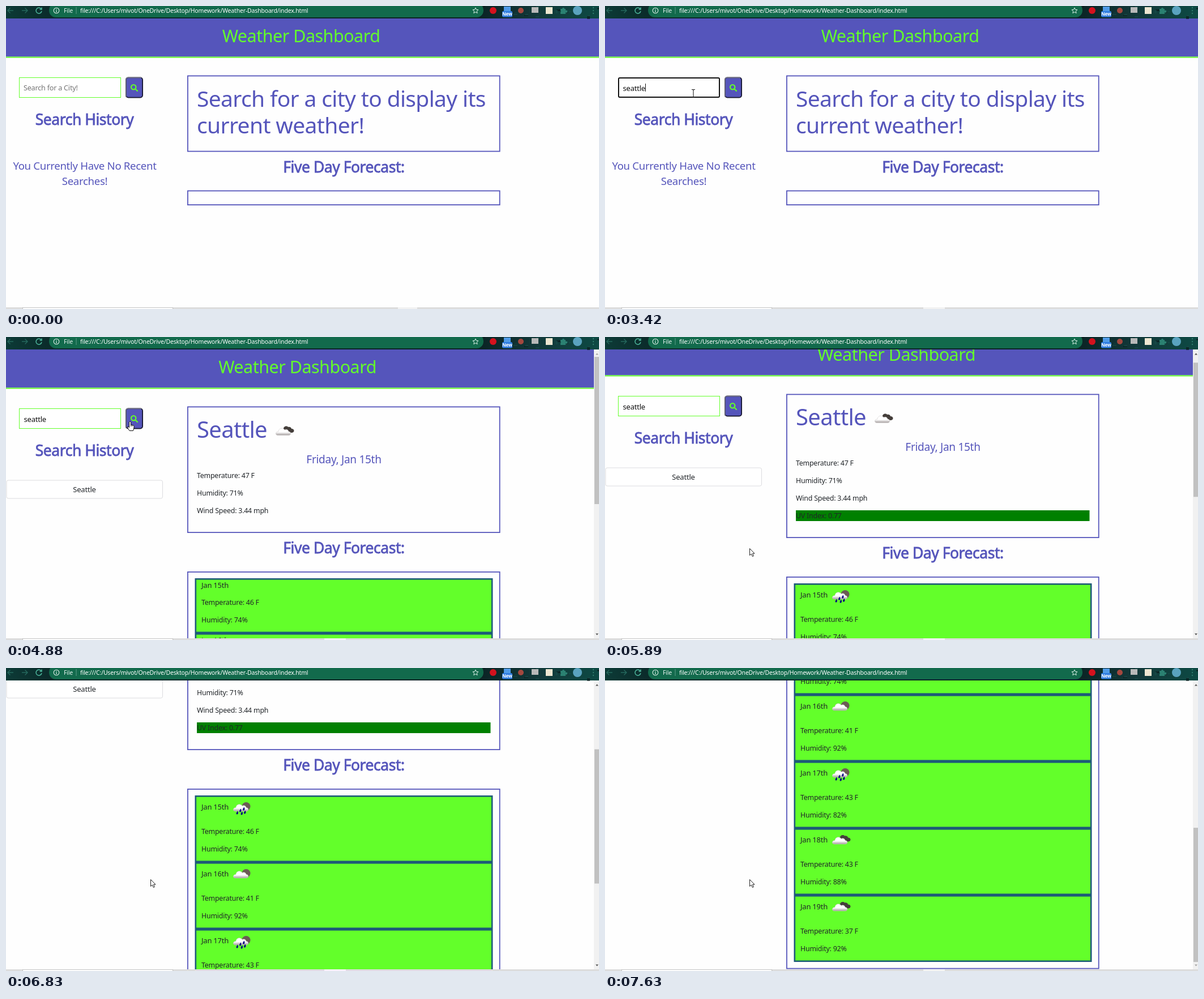
Animation, 1047 px wide and 535 px high, one loop 8000 ms. Source, as an HTML page:

```html
<!DOCTYPE html>
<html lang="en">
<head>
<meta charset="utf-8">
<title>Weather Dashboard</title>
<style>
  html, body { margin: 0; width: 100%; height: 100%; overflow: hidden; background: #fefefe; }
  svg { display: block; width: 100vw; height: 100vh; }
  text { font-family: "Noto Sans", "Open Sans", sans-serif; letter-spacing: -.017em; white-space: pre; }
</style>
</head>
<body>
<svg id="stage" viewBox="0 0 1047 535">
  <defs>
    <linearGradient id="cloud" x2="0" y2="1">
      <stop offset=".55" stop-color="#fff"/><stop offset="1" stop-color="#a39c9c"/>
    </linearGradient>
    <linearGradient id="toolbar">
      <stop offset="0" stop-color="#0c3a36"/><stop offset=".07" stop-color="#0b2c2b"/>
      <stop offset=".8" stop-color="#0b2425"/><stop offset=".9" stop-color="#12393a"/>
      <stop offset="1" stop-color="#0d4a44"/>
    </linearGradient>
  </defs>
  <g id="page"></g>
  <g id="browser"></g>
  <g id="overlay"></g>
</svg>
<script>
const LOOP = 8000;
const INDIGO = '#5555bb', LIME = '#63ff2a', INK = '#212529', STEEL = '#1d5a78';
const layer = id => document.getElementById(id);

// Times in ms; each row holds until the next one.
const SCROLL = [[0, 0], [5890, 22], [5970, 58], [6050, 90], [6130, 118], [6210, 146], [6280, 178],
  [6450, 200], [6830, 232], [6910, 300], [7000, 369], [7080, 393], [7170, 400], [7550, 475], [7630, 528]];
const POINTER = [[0, 'none', 0, 0], [150, 'arrow', 640, 470], [230, 'arrow', 380, 290], [310, 'arrow', 243, 183],
  [610, 'arrow', 212, 172], [690, 'beam', 172, 161], [760, 'beam', 159, 158], [930, 'beam', 157, 155],
  [1010, 'beam', 156, 154], [3970, 'beam', 162, 154], [4050, 'beam', 182, 155], [4130, 'arrow', 206, 152],
  [4200, 'hand', 219, 149], [5100, 'hand', 222, 160], [5180, 'arrow', 228, 200], [5260, 'arrow', 238, 260],
  [5340, 'arrow', 247, 315], [5420, 'arrow', 253, 355], [5500, 'arrow', 255, 370], [5580, 'arrow', 255, 373]];
const KEYS = [2420, 2590, 2760, 2930, 3100, 3250, 3420];
const CARET_X = [32, 37, 44, 50, 56, 60, 64, 71];
const DAYS = [[15, 46, 74, 'rain'], [16, 41, 92, 'sun'], [17, 43, 82, 'rain'], [18, 43, 88, 'broken'], [19, 37, 92, 'broken']];

const stepAt = (rows, t) => rows.filter(row => row[0] <= t).pop();

const rect = (x, y, w, h, fill, extra = '') =>
  `<rect x="${x}" y="${y}" width="${w}" height="${h}" fill="${fill}" ${extra}/>`;
const frame = (x, y, w, h, color, line, fill = 'none', radius = 0) =>
  rect(x + line / 2, y + line / 2, w - line, h - line, fill, `stroke="${color}" stroke-width="${line}" rx="${radius}"`);
const panel = (top, height) => frame(320, top, 552.6, height, INDIGO, 1.8);
const circle = (x, y, r, fill) => `<circle cx="${x}" cy="${y}" r="${r}" fill="${fill}"/>`;
const path = (d, fill, stroke = 'none', width = 1, extra = '') =>
  `<path d="${d}" fill="${fill}" stroke="${stroke}" stroke-width="${width}" ${extra}/>`;
const moved = (x, y, content) => `<g transform="translate(${x} ${y})">${content}</g>`;

// y is the middle of the capitals.
const text = (s, x, y, size, fill, extra = '') =>
  `<text x="${x}" y="${y + size * .35}" font-size="${size}" fill="${fill}" ${extra}>${s}</text>`;
const centered = (s, x, y, size, fill, extra = '') => text(s, x, y, size, fill, 'text-anchor="middle" ' + extra);
const heading = (s, x, y) => centered(s, x, y, 26.5, INDIGO, `stroke="${INDIGO}" stroke-width=".8"`);
const body = (s, x, y) => text(s, x, y, 12.4, INK);

function weatherIcon(kind, x, y) {
  const cloud = 'M4 15.5C-1 15.5-1 9 5 9C5 3 13 1 16 6C20 4 23 7 23 9C28 9 28 15.5 23 15.5Z';
  const back = kind === 'broken'
    ? path('M14 5C13 0 20-2 22 1C25 0 28 2 28 4C34 4 34 11 28 11H18Z', '#443e3a')
    : circle(23, 7, 7.5, '#6b5b54');
  const drops = kind !== 'rain' ? '' : [[7, 18], [12.5, 14], [15, 19], [18.5, 11], [20.5, 17]]
    .map(([dx, dy]) => path(`M${dx + 1} ${dy - 3}C${dx + 5} ${dy + 5} ${dx - 6} ${dy + 5} ${dx + 1} ${dy - 3}`, '#000080')).join('');
  return moved(x, y, back + path(cloud, 'url(#cloud)', '#c9c4c4', .5) + drops);
}

function forecast(top, complete) {
  const height = complete ? 118 : 97, lead = complete ? 20.5 : 12, gap = complete ? 43.5 : 31;
  const cards = DAYS.map(([day, temperature, humidity, kind], i) => {
    const y = top + 12 + i * height, row = y + lead;
    return frame(333.5, y, 526, height, STEEL, 2.6, LIME)
      + text(`Jan ${day}th`, 345, row, 13, INK)
      + (complete ? weatherIcon(kind, 401, row - 8) : '')
      + body(`Temperature: ${temperature} F`, 345, row + gap)
      + body(`Humidity: ${humidity}%`, 345, row + gap + 31);
  });
  return panel(top, 5 * height + 24.5) + cards.join('');
}

function searchColumn(t, loaded) {
  const focused = t >= 1240 && t < 4570;
  const typed = KEYS.filter(key => key <= t).length;
  const caretOn = focused && (t < 1800 || t >= 2350 && t < 3970 || t >= 4500);
  return (focused ? frame(23, 126, 180, 36, '#111', 2, '#fff', 2) : frame(23, 126, 180, 36, LIME, 1, '#fff'))
    + (typed ? text('seattle'.slice(0, typed), 31.6, 145, 13, '#111') : text('Search for a City!', 31, 145, 12.6, '#757575'))
    + (caretOn ? rect(CARET_X[typed], 137, 1, 14, '#111') : '')
    + frame(211, 125.5, 31, 37, '#17172e', 1.8, INDIGO, 4)
    + path('M212 161V129Q212 126.5 215 126.5H239', 'none', '#77778c', 1.4)
    + path('M229 147L232 150M229.4 143.2A4.2 4.2 0 1 1 221 143.2A4.2 4.2 0 1 1 229.4 143.2', 'none', LIME, 2.2, 'stroke-linecap="round"')
    + heading('Search History', 138.5, 201)
    + (loaded
      ? frame(.5, 252.5, 276.5, 33, '#dcdcdf', 1, '#fff', 3) + centered('Seattle', 138.5, 269, 13, INK)
      : centered('You Currently Have No Recent', 139, 282, 18.6, INDIGO) + centered('Searches!', 139, 309, 18.6, INDIGO));
}

function weatherColumn(loaded, complete, cleared) {
  if (!loaded) {
    const bottom = cleared ? 149 : 257;
    return panel(122.5, bottom - 122)
      + (cleared ? '' : text('Search for a city to display its', 337, 164.3, 39, INDIGO) + text('current weather!', 337, 211, 39, INDIGO))
      + heading('Five Day Forecast:', 596.5, bottom + 28)
      + panel(bottom + 68.5, 26.5);
  }
  const bottom = complete ? 376.5 : 345.5;
  return panel(122.5, bottom - 122)
    + text('Seattle', 337, 164.3, 40, INDIGO)
    + weatherIcon('broken', 476, 158)
    + centered('Friday, Jan 15th', 596.5, 216, 19.1, INDIGO)
    + body('Temperature: 47 F', 337, 245)
    + body('Humidity: 71%', 337, 276)
    + body('Wind Speed: 3.44 mph', 337, 307)
    + (complete ? rect(337, 328, 518.5, 19, '#008000') + body('UV Index: 0.77', 337, 338) : '')
    + heading('Five Day Forecast:', 596.5, bottom + 27.5)
    + forecast(bottom + 68.5, complete);
}

function scrollbar(offset, complete) {
  const thumb = complete ? 237 : 260;
  return rect(1038, 22, 9, 510, '#f1f1f1')
    + rect(1039, 35 + offset * .468, 8, thumb, '#c1c1c1')
    + path('M1041 31.5L1043.5 28.5L1046 31.5Z', offset ? '#505050' : '#a3a3a3')
    + path('M1041 523.5L1043.5 526.5L1046 523.5Z', offset < 528 ? '#505050' : '#a3a3a3');
}

function pointer([, kind, x, y]) {
  const shapes = {
    none: '',
    arrow: path('M.5.5V12.5L3.4 10L5.3 14.5L7.4 13.6L5.5 9.2H9Z', '#fff', '#222'),
    beam: path('M-3-6.5H-1L0-5.5L1-6.5H3M0-5.5V6M-3 7H-1L0 6L1 7H3', 'none', '#222', 1.1),
    hand: path('M-1.5 1Q0-1 1.4 1V6L6 7Q7.5 8 7 11L5.5 16.5H-1L-4.5 11Q-5 9-3 9.4L-1.5 11Z', '#fff', '#111')
      + path('M1.4 6V9M3.8 6.6V9.3', 'none', '#111', .8)
  };
  return moved(x, y, shapes[kind]);
}

function browserBar() {
  const dim = '#25685d', mint = '#4cb59b';
  const specks = Array.from({ length: 34 }, (_, i) =>
    rect(843 + i * 37 % 204, i * 7 % 19, 3 + i % 5, 2 + i % 4, i % 3 ? '#174b49' : '#081719', 'opacity=".65"')).join('');
  return rect(0, 0, 1047, 22, 'url(#toolbar)') + specks
    + rect(76, -5, 767, 25, '#126a4c', 'rx="12"')
    + path('M13 8H3M7.5 3.5L3 8L7.5 12.5M28 8H38M33.5 3.5L38 8L33.5 12.5', 'none', dim, 1.4)
    + path('M62 5A5 5 0 1 0 63 9M63 2.5V6H59.5', 'none', mint, 1.5)
    + '<circle cx="89" cy="8" r="4.8" fill="none" stroke="#e5f2ee" stroke-width="1.1"/>'
    + path('M89 5V6.2M89 7.2V11', 'none', '#e5f2ee', 1.2)
    + text('File', 102, 8, 10.5, '#e5f2ee')
    + rect(123.5, 2, 1, 12, '#5b9c87')
    + text('file:///C:/Users/mivot/OneDrive/Desktop/Homework/Weather-Dashboard/index.html', 131, 8, 10.5, '#fff')
    + path('M829 3L830.5 6.4L834 6.7L831.3 9L832.2 12.6L829 10.7L825.8 12.6L826.7 9L824 6.7L827.5 6.4Z', 'none', '#d7eee5', 1)
    + circle(860, 8, 6, '#d5121e')
    + rect(879, 1, 12, 9, '#4f9be8')
    + rect(876, 9, 18, 10.5, '#2f7de1', 'rx="2"') + centered('New', 885, 14.5, 8, '#fff', 'font-weight="700"')
    + circle(909, 8, 5, '#a4483f')
    + rect(928, 2, 12, 10, '#b9b9b9')
    + rect(953, 2, 12, 12, '#eee7d2')
    + path('M979 5H982A2 2 0 1 1 986 5H988V8A2 2 0 1 1 988 11V14H979V11A2 2 0 0 0 979 8Z', '#2b8172')
    + circle(1009, 8, 8, '#5aa3bf')
    + [3, 8, 13].map(y => circle(1037, y, 1.2, '#2f7b6c')).join('');
}

function taskbar(t) {
  const light = t < 1240 ? [692, 34] : [562, 38];
  return rect(0, 532, 1047, 3, '#dcdcdc')
    + rect(29, 532, 266, 3, '#c4c4c4') + rect(30, 533, 264, 2, '#fff')
    + rect(light[0], 532, light[1], 3, '#f2f2f2');
}

function draw(t) {
  const loaded = t >= 4800, complete = t >= 4960, cleared = t >= 4650;
  const offset = stepAt(SCROLL, t)[1];
  const width = loaded ? 1038 : 1047;
  const page = rect(0, 22, width, 67.5, INDIGO) + rect(0, 89.5, width, 2, LIME)
    + centered('Weather Dashboard', loaded ? 514.5 : 521, 53, 30.5, LIME)
    + searchColumn(t, loaded) + weatherColumn(loaded, complete, cleared);
  return moved(0, -offset, page) + (loaded ? scrollbar(offset, complete) : '');
}

const shown = {};
function show(id, markup) {
  if (shown[id] !== markup) layer(id).innerHTML = shown[id] = markup;
}

show('browser', browserBar());
const start = performance.now();
function tick() {
  const t = (performance.now() - start) % LOOP;
  show('page', draw(t));
  show('overlay', taskbar(t) + pointer(stepAt(POINTER, t)));
  requestAnimationFrame(tick);
}
tick();
</script>
</body>
</html>
```
